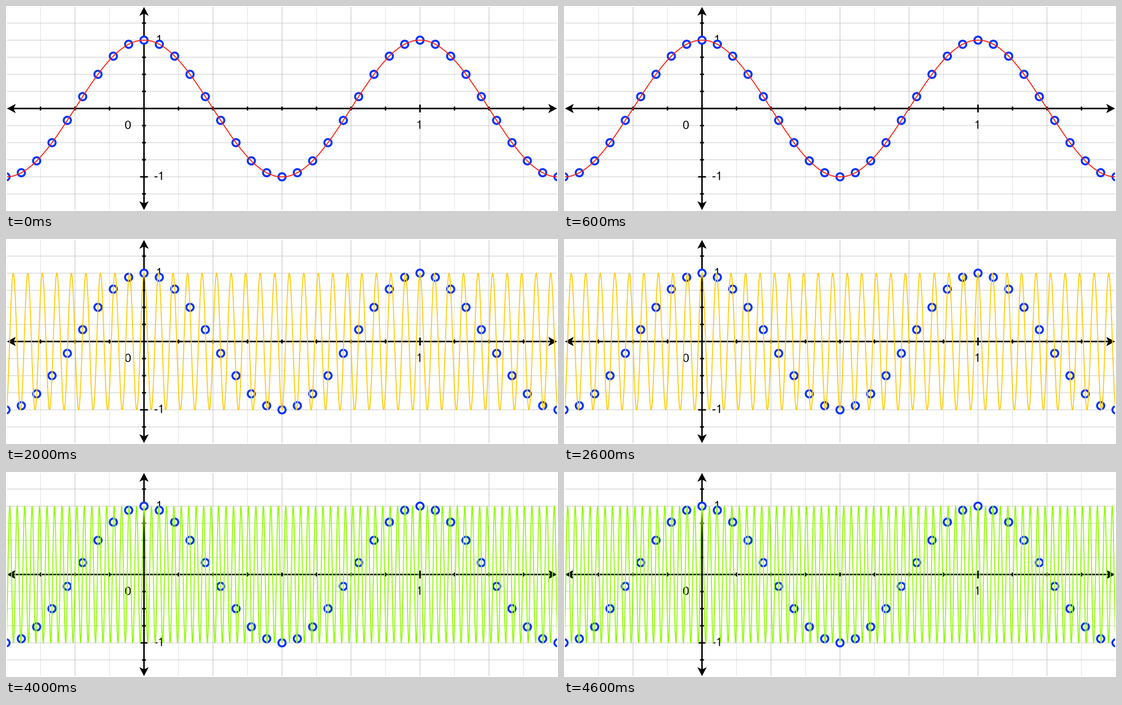
Recreate the animation shown at these times as a matplotlib script. Size 1130 by 420 pixels, loop 5 s.

```python
import numpy as np
import matplotlib.pyplot as plt
from matplotlib.animation import FuncAnimation
from matplotlib.patches import Circle, Polygon, Rectangle

plt.rcParams["path.simplify"] = False

W, H, DPI = 1130, 420, 100
X0, Y0, UNIT, AMP = 282.5, 210, 565, 140
LEFT, RIGHT, TOP, BOTTOM = 2, 1128, 2, 418
RATE = 18
PT = 72 / DPI
FONT = 24
STEM = 2.1
WAVES = [(1, "#ff2110"), (17, "#ff7600"), (19, "#ffcc0a"),
         (35, "#fbe016"), (37, "#90fb05")]

fig = plt.figure(figsize=(W / DPI, H / DPI), dpi=DPI, facecolor="white")
ax = fig.add_axes([0, 0, 1, 1])
ax.set_xlim(0, W)
ax.set_ylim(H, 0)
ax.axis("off")
frame = Rectangle((LEFT, TOP), RIGHT - LEFT, BOTTOM - TOP,
                  transform=ax.transData)


def line(xs, ys, color, width, z):
    item = ax.plot(xs, ys, color=color, lw=width * PT, zorder=z,
                   solid_capstyle="butt", solid_joinstyle="miter",
                   snap=False)[0]
    item.set_clip_path(frame)
    return item


def patch(item):
    ax.add_patch(item)
    item.set_clip_path(frame)


def arrow(x, y, dx, dy, length=18, half=9.5, notch=13.5):
    """Barbed head with its tip at (x, y), pointing along (dx, dy)."""
    local = [(0, 0), (-length, half), (-notch, 0), (-length, -half)]
    points = [(x + a * dx - b * dy, y + a * dy + b * dx) for a, b in local]
    patch(Polygon(points, fc="black", lw=0, zorder=3))


def one(stem, base):
    """Footless numeral: an upright stem with a short bent flag."""
    top = base - 0.709 * FONT
    line([stem, stem], [top, base], "black", STEM, 4)
    line([stem - 4.8, stem - 2, stem - 0.4],
         [top + 4.2, top + 3.3, top + 0.4], "black", 1.5, 4)


def draw_grid():
    for k in range(-3, 12):
        x = X0 + k * UNIT / 8
        line([x, x], [TOP, BOTTOM], "#dedede" if k % 2 else "#b8b8b8", 1, 1)
    for k in range(-5, 6):
        y = Y0 + k * AMP / 4
        line([LEFT, RIGHT], [y, y], "#c4c4c4", 1, 1)


def draw_axes():
    line([LEFT + 12, RIGHT - 12], [Y0, Y0], "black", 3, 3)
    line([X0, X0], [TOP + 12, BOTTOM - 12], "black", 3, 3)
    arrow(LEFT, Y0, -1, 0)
    arrow(RIGHT, Y0, 1, 0)
    arrow(X0, TOP, 0, -1)
    arrow(X0, BOTTOM, 0, 1)
    for k in range(-3, 12):
        x, r = X0 + k * UNIT / 8, 8 if k == 8 else 4
        line([x, x], [Y0 - r, Y0 + r], "black", 3, 3)
    for k in range(-5, 6):
        y, r = Y0 + k * AMP / 4, 8 if abs(k) == 4 else 4
        line([X0 - r, X0 + r], [y, y], "black", 3, 3)


def draw_labels():
    ax.text(249.3, 251.5, "0", family="Liberation Sans", size=FONT * PT,
            ha="center", va="baseline", zorder=4)
    one(847.2, 251.5)
    one(314.3, 76.5)
    one(318.3, 356.5)
    line([304, 310], [350, 350], "black", STEM, 4)


def draw_samples():
    for n in range(-9, 28):
        t = n / RATE
        y = Y0 - AMP * np.cos(2 * np.pi * t)
        patch(Circle((X0 + t * UNIT, y), 7.4, fc="white",
                     ec="#0433ff", lw=4 * PT, zorder=5))


draw_grid()
draw_axes()
draw_labels()
draw_samples()

xs = np.arange(0, W + 0.1, 0.25)
wave = line(xs, np.full_like(xs, Y0), "black", 2, 6)


def update(i):
    freq, color = WAVES[i % len(WAVES)]
    wave.set_ydata(Y0 - AMP * np.cos(2 * np.pi * freq * (xs - X0) / UNIT))
    wave.set_color(color)
    return [wave]


anim = FuncAnimation(fig, update, frames=len(WAVES), interval=1000,
                     init_func=lambda: update(0), repeat=True, repeat_delay=0)
plt.show()
```
